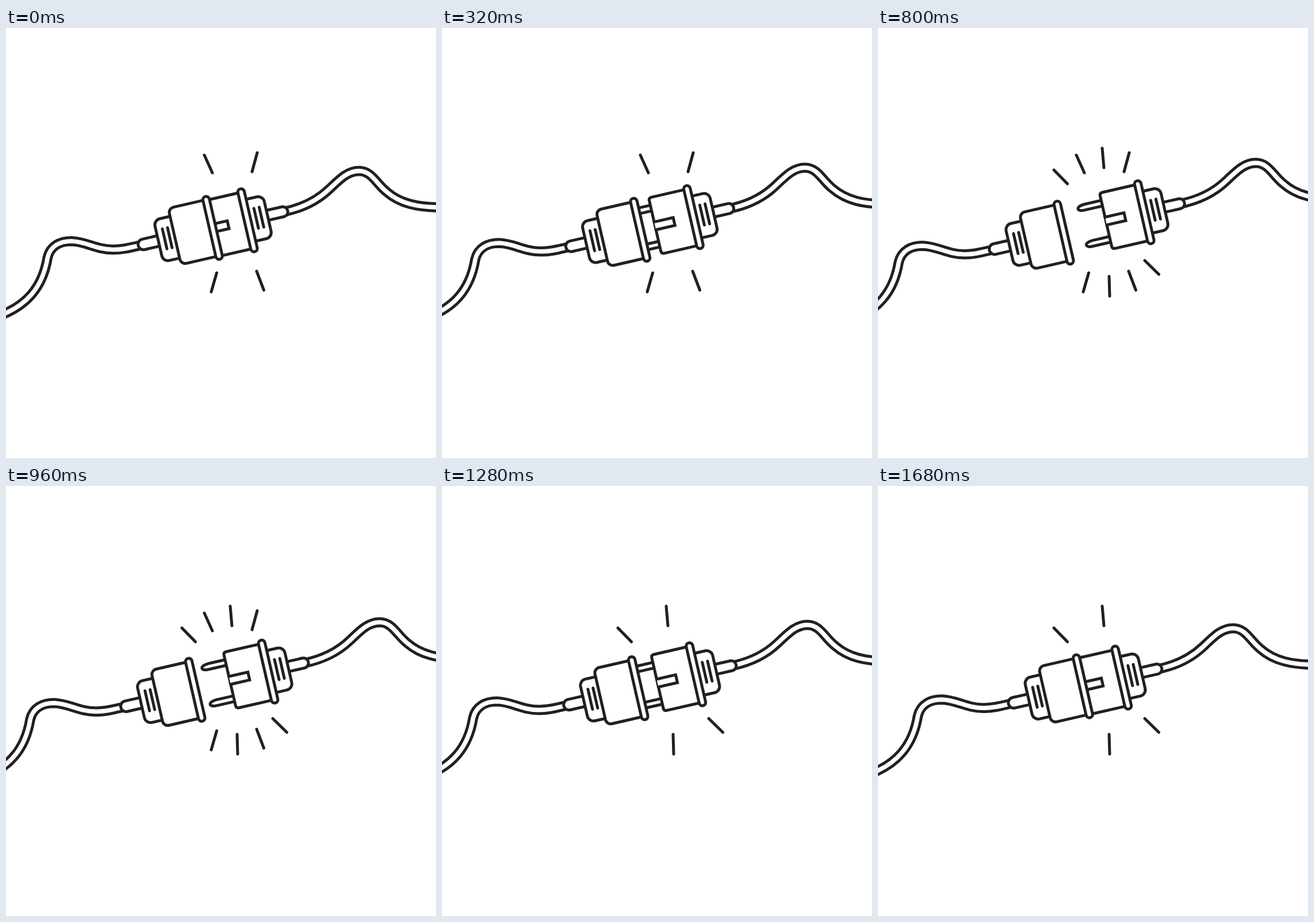
An HTML page that plays this animation: 748x748 px, repeating every 1.76 s.

```html
<!DOCTYPE html>
<html lang="en">
<head>
<meta charset="utf-8">
<title>Plug and socket</title>
<style>
  html, body { margin: 0; width: 100%; height: 100%; overflow: hidden; background: #fff; }
  svg { display: block; width: 100vw; height: 100vh; }
  .line { fill: #fff; stroke: #231f20; stroke-width: 5; stroke-linecap: round; stroke-linejoin: round; }
  .sharp { stroke-linejoin: miter; }
  .cable { fill: none; stroke: #231f20; stroke-width: 17.6; }
  .core { stroke: #fff; stroke-width: 7.6; }
</style>
</head>
<body>
<svg viewBox="0 0 748 748">
  <defs>
    <path id="wireL" d="M-10 500C34 483 63.5 453 72.3 399.5C77 379 94 370.7 114 370.7C141 371.7 156 385.5 187 385.5C205 385.5 218 381.5 240 376.5"/>
    <path id="wireR" d="M482 320C515 313.4 540 301.5 562 280.6C580 263.6 594 248.6 614 248.6C636 248.6 644 270.6 662 284.8C685 304.8 715 312.4 760 312"/>
    <path id="prong" d="M-64 -5H-99C-106 -4.8 -111 -2.4 -111 .4C-111 3.6 -106 5 -101 5H-64"/>
    <rect id="rim" x="-5.7" y="-56" width="11.4" height="112" rx="5.7"/>
  </defs>

  <g id="rays1" class="line"><path d="M345 221L359 252M437 217L428 250M366.5 426L357 459M436 423L448.5 456"/></g>
  <g id="rays2" class="line"><path d="M306 247L329.5 271M390 209L393 243M402 432L403 466.5M464 404.5L488.5 428.5"/></g>

  <g id="plug">
    <use href="#wireR" class="cable"/>
    <use href="#wireR" class="cable core"/>
    <g class="line" transform="translate(420.2 334.5) rotate(-12.9)">
      <use href="#prong" y="-31.8"/>
      <use href="#prong" y="32.7"/>
      <path d="M30 -9.5H64A8.8 8.8 0 0 1 64 8H30Z"/>
      <path d="M0 -36.2H24.7A11 11 0 0 1 35.7 -25.2V27.5A11 11 0 0 1 24.7 38.5H0Z"/>
      <path d="M15.4 -17.8V17.8M24.8 -17.8V17.8"/>
      <path d="M0 -50H-63.5Q-68.5 -50 -68.5 -45V45Q-68.5 50 -63.5 50H0Z"/>
      <path class="sharp" d="M-68.5 -7H-34.6V7H-68.5"/>
      <use href="#rim"/>
    </g>
  </g>

  <g id="socket">
    <use href="#wireL" class="cable"/>
    <use href="#wireL" class="cable core"/>
    <g class="line" transform="translate(359.4 347.7) rotate(-12.9)">
      <path d="M-90 -8.2H-123.7A9.3 9.3 0 0 0 -123.7 10.4H-90Z"/>
      <path d="M-60 -36H-86A11 11 0 0 0 -97 -25V27.5A11 11 0 0 0 -86 38.5H-60Z"/>
      <path d="M-85.6 -17.8V17.8M-76.4 -17.8V17.8"/>
      <path d="M0 -50.3H-58.2A9.5 9.5 0 0 0 -67.7 -40.8V40.5A9.5 9.5 0 0 0 -58.2 50H0Z"/>
      <use href="#rim"/>
    </g>
  </g>
</svg>
<script>
  const LOOP = 1760, STEP = 80, PEAK = 800;
  const el = id => document.getElementById(id);
  const plug = el("plug"), socket = el("socket");
  const rays1 = el("rays1"), rays2 = el("rays2");

  function shift(node, x, y) {
    node.setAttribute("transform", `translate(${x.toFixed(2)} ${y.toFixed(2)})`);
  }

  function show(node, on) {
    node.setAttribute("visibility", on ? "visible" : "hidden");
  }

  // Pulls apart until PEAK, then slides back together, in even steps.
  function draw(now) {
    const t = Math.floor((now % LOOP) / STEP) * STEP;
    const gap = t < PEAK ? t / PEAK : (LOOP - t) / (LOOP - PEAK);
    shift(plug, 43 * gap, -14 * gap);
    shift(socket, -36.3 * gap, 8.2 * gap);
    show(rays1, t < 1280);
    show(rays2, t >= 560);
  }

  let start;
  function tick(now) {
    start ??= now;
    draw(now - start);
    requestAnimationFrame(tick);
  }
  draw(0);
  requestAnimationFrame(tick);
</script>
</body>
</html>
```
